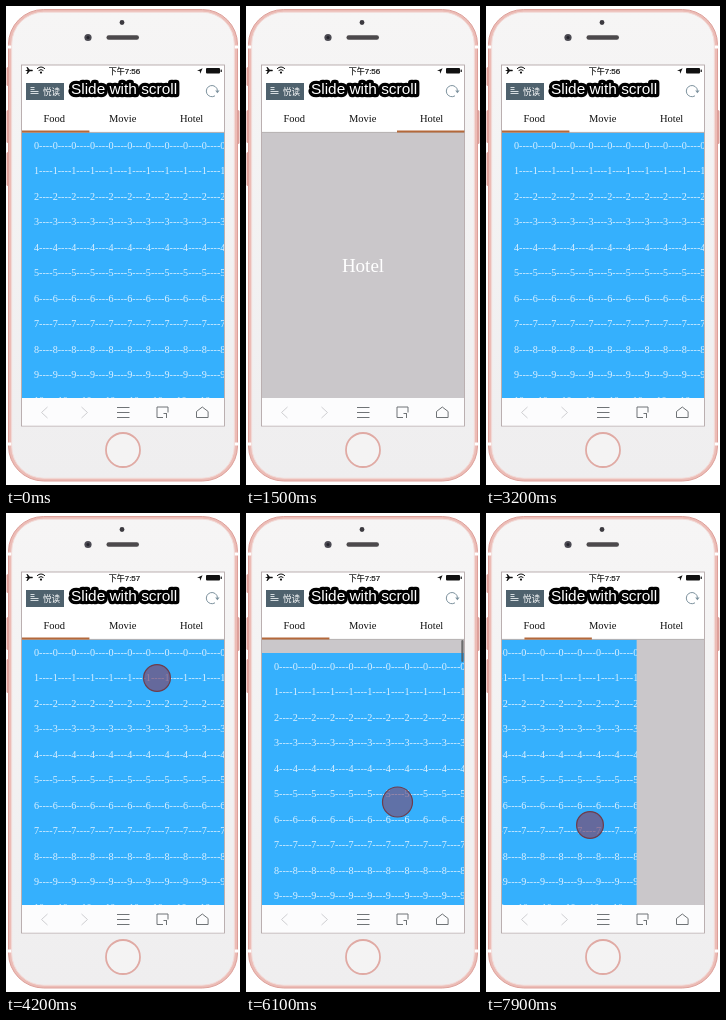
An HTML page for the animation above (8 s loop, 234 by 479 pixels).

```html
<!DOCTYPE html>
<html lang="en">
<head>
<meta charset="utf-8">
<title>Slide with scroll</title>
<style>
  html, body { margin: 0; width: 100%; height: 100%; overflow: hidden; background: #fff; }
  svg { display: block; }
  .serif { font-family: "Liberation Serif", "Times New Roman", serif; }
  .sans { font-family: "Liberation Sans", "Noto Sans CJK SC", "Noto Sans CJK", sans-serif; }
  .mid { text-anchor: middle; }
  .line { fill: none; stroke-width: 1; }
</style>
</head>
<body>
<svg id="stage" width="234" height="479" viewBox="0 0 234 479">
  <defs>
    <clipPath id="view"><rect x="16" y="126.5" width="202" height="265.5"/></clipPath>
    <clipPath id="page"><rect x="16" y="0" width="202" height="479"/></clipPath>
    <linearGradient id="face" x2="0" y2="1">
      <stop offset="0" stop-color="#f6f5f5"/>
      <stop offset="1" stop-color="#efeeef"/>
    </linearGradient>
  </defs>

  <!-- phone -->
  <g fill="#dfa19b">
    <rect x="0.5" y="61" width="4" height="19" rx="1.5"/>
    <rect x="0.5" y="104" width="4" height="33" rx="1.5"/>
    <rect x="0.5" y="146" width="4" height="34" rx="1.5"/>
    <rect x="229.5" y="104" width="4" height="34" rx="1.5"/>
  </g>
  <rect x="2.5" y="3.5" width="229" height="471.5" rx="35" fill="#ecbcb6" stroke="#dda09a"/>
  <path d="M2 41h4M228 41h4M2 438h4M228 438h4" stroke="#fff" stroke-width="3"/>
  <rect x="5.7" y="6.2" width="222.6" height="466" rx="32" fill="url(#face)" stroke="#f3dcd9"/>
  <circle cx="116" cy="16.5" r="2.4" fill="#3d3b40"/>
  <circle cx="82" cy="31.5" r="3.6" fill="#4b4a52"/>
  <circle cx="82" cy="31.5" r="1.5" fill="#25242c"/>
  <rect x="100.5" y="29.3" width="32.5" height="4.4" rx="2.2" fill="#4c494c"/>
  <circle cx="117" cy="444" r="17" fill="#f4f3f3" stroke="#e0aaa4" stroke-width="1.8"/>
  <rect x="15.5" y="59" width="203" height="361" fill="#fff" stroke="#b3a7a8" stroke-width=".9"/>

  <!-- pages -->
  <g clip-path="url(#view)">
    <rect x="16" y="126" width="202" height="267" fill="#cac7ca"/>
    <g id="pages">
      <g clip-path="url(#page)">
        <g id="list" class="serif" font-size="10.18" fill="#dcf0ff">
          <rect x="16" y="126" width="202" height="340" fill="#35b0fd"/>
        </g>
        <rect id="bar" x="215.3" y="127" width="2.2" rx="1.1" fill="#555" fill-opacity=".8"/>
      </g>
      <g class="serif mid" font-size="19" fill="#fff">
        <text x="319" y="266">Movie</text>
        <text x="521" y="266">Hotel</text>
      </g>
    </g>
  </g>

  <!-- status bar -->
  <g fill="#111">
    <path d="M19 64.5l2.6-.8L20.4 61h1l2.4 2.7h2.6q1 .8 0 1.6h-2.6L21.4 68h-1l1.2-2.7z"/>
    <path d="M31 62.8q4-3.6 8 0M32.6 64.6q2.4-2 4.8 0" class="line" stroke="#111" stroke-width="1.2"/>
    <circle cx="35" cy="66.6" r="1.1"/>
    <text id="clock" class="sans mid" x="118.5" y="67.6" font-size="8" stroke="#111" stroke-width=".2"></text>
    <path d="M191 64.8l5.6-2.6-2.4 5.6-.5-2.7z"/>
    <rect x="200" y="62" width="14" height="5.6" rx="1"/>
    <rect x="214.6" y="63.6" width="1.2" height="2.4"/>
  </g>

  <!-- address bar -->
  <rect x="20" y="77" width="38" height="17" fill="#4e616d"/>
  <path d="M24.5 81.5h4M24.5 83.5h4M24.5 85.5h8M24.5 87.5h8" class="line" stroke="#d5dce0"/>
  <text class="sans" x="37" y="88.6" font-size="8.6" fill="#fff">悦读</text>
  <path d="M209 89.8a5.6 5.6 0 1 1 2.5-5.2" class="line" stroke="#7d929e"/>
  <path d="M209.2 84.4h4.4l-2.2 2.8z" fill="#7d929e"/>
  <text class="sans" x="65" y="87.5" font-size="15.4" fill="#fff" stroke="#000" stroke-width="6.5"
        stroke-linejoin="round" paint-order="stroke">Slide with scroll</text>

  <!-- tabs -->
  <g class="serif mid" font-size="10.5" fill="#111">
    <text x="48.2" y="116">Food</text>
    <text x="116.6" y="116">Movie</text>
    <text x="185.6" y="116">Hotel</text>
  </g>
  <path d="M16 126.4h202" class="line" stroke="#b5b0b0" stroke-width=".6"/>
  <rect id="mark" x="16" y="124.5" width="67.4" height="2" fill="#b4683a"/>

  <!-- toolbar -->
  <rect x="16" y="392" width="202" height="27.5" fill="#fcfcfd"/>
  <g class="line" stroke="#6f7376">
    <path d="M41.5 401l-6 5.5 6 5.5M75.5 401l6 5.5-6 5.5" stroke="#cfcfd2"/>
    <path d="M111 401.5h12.5M111 406.5h12.5M111 411.5h12.5"/>
    <path d="M157 411.5h-6v-10.5h11v5.5M157.5 407.5h3M160.5 407v5"/>
    <path d="M190.5 405.5l5.8-4.5 5.8 4.5v6h-11.6z"/>
  </g>

  <circle id="touch" fill="rgb(123,75,114)" stroke="#6d3d4c" stroke-width="1.2"/>
</svg>

<script>
const LOOP = 8000, STEP = 100, PAGE = 202, TAB = 67.5;
const $ = id => document.getElementById(id);

// [time, value, eased?]
const slide = [
  [100, 0], [500, 100], [700, PAGE, 1],
  [800, PAGE], [1100, 300], [1300, 2 * PAGE, 1],
  [1700, 2 * PAGE], [2000, 305], [2400, PAGE, 1],
  [2500, PAGE], [2800, 104], [3200, 0, 1],
  [7500, 0], [8000, 84]
];
const pull = [
  [4200, 0], [5400, 67.6], [5800, 0, 1],
  [5800, 0], [6100, 14], [6500, 0, 1],
  [6500, 0], [6900, 45], [7300, 0, 1]
];
// [start, end, x0, y0, x1, y1]
const drags = [
  [200, 500, 150, 290, 75, 290],
  [900, 1100, 140, 290, 75, 290],
  [1800, 2000, 95, 290, 160, 290],
  [2600, 2800, 95, 290, 160, 290],
  [4200, 5400, 151, 165, 185, 306],
  [5800, 6100, 155, 262, 151.5, 289],
  [6500, 6900, 152, 235, 160, 325],
  [7500, 8000, 170, 312, 87.5, 312]
];

const mix = (a, b, k) => a + (b - a) * k;

function at(keys, t) {
  const i = keys.findIndex(key => key[0] > t);
  if (i < 0) return keys[keys.length - 1][1];
  if (i === 0) return keys[0][1];
  const [t0, v0] = keys[i - 1], [t1, v1, eased] = keys[i];
  const k = (t - t0) / (t1 - t0);
  return mix(v0, v1, eased ? 1 - (1 - k) ** 3 : k);
}

for (let i = 0; i < 13; i++) {
  const row = document.createElementNS("http://www.w3.org/2000/svg", "text");
  row.setAttribute("x", 28);
  row.setAttribute("y", 142.9 + 25.5 * i);
  row.textContent = `${i}----`.repeat(13);
  $("list").append(row);
}

function drawTouch(t) {
  const touch = $("touch");
  const drag = drags.find(d => t >= d[0] && t <= d[1]);
  touch.style.display = drag ? "" : "none";
  if (!drag) return;
  const [t0, t1, x0, y0, x1, y1] = drag, k = (t - t0) / (t1 - t0);
  // The spot swells and fades as the finger lifts.
  const lifting = k === 1;
  touch.setAttribute("cx", mix(x0, x1, k));
  touch.setAttribute("cy", mix(y0, y1, k));
  touch.setAttribute("r", lifting ? 15 : 13.4);
  touch.setAttribute("fill-opacity", lifting ? .62 : .7);
}

function draw(t) {
  const x = at(slide, t), y = at(pull, t);
  $("pages").setAttribute("transform", `translate(${-x} 0)`);
  $("mark").setAttribute("transform", `translate(${x / PAGE * TAB} 0)`);
  $("list").setAttribute("transform", `translate(0 ${y})`);
  $("bar").setAttribute("height", Math.max(4.5, 36 - y));
  $("bar").style.display = y > 0 ? "" : "none";
  $("clock").textContent = t < 3900 ? "下午7:56" : "下午7:57";
  drawTouch(t);
}

function tick() {
  draw(Math.floor(performance.now() % LOOP / STEP) * STEP);
  requestAnimationFrame(tick);
}
tick();
</script>
</body>
</html>
```
